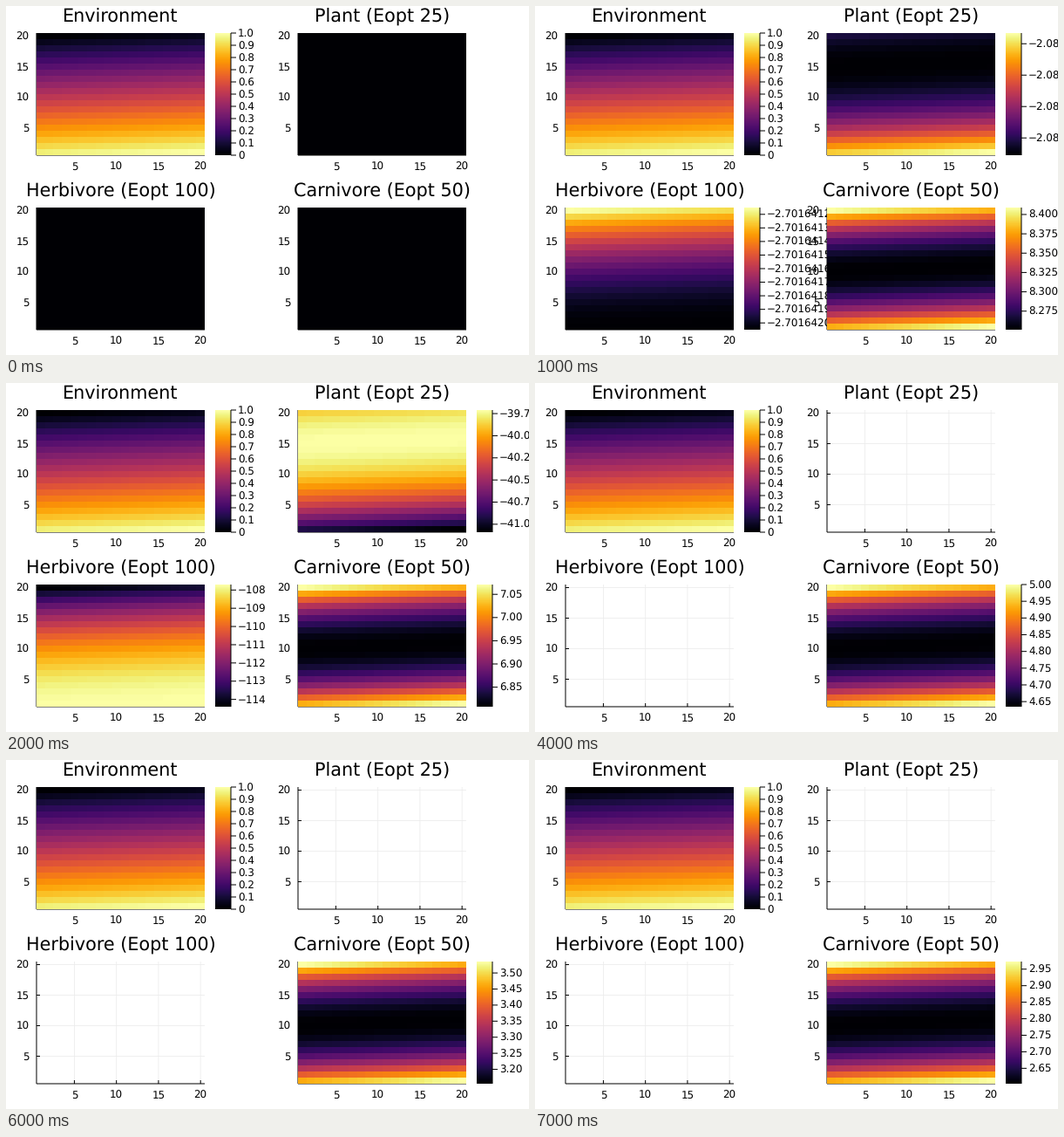
Animation, 600 px wide and 400 px high, one loop 8 s. Source, as a matplotlib script:

```python
import math

import matplotlib.pyplot as plt
import numpy as np
from matplotlib.animation import FuncAnimation

W, H = 600, 400
PX = 0.72                      # points per pixel at 100 dpi
TICK_SIZE, TITLE_SIZE = 11.9, 20.8
PANEL_W, PANEL_H = 193, 140
STEPS = 8

plt.rcParams["font.family"] = "DejaVu Sans"
plt.rcParams["text.hinting"] = "none"
fig = plt.figure(figsize=(W / 100, H / 100), dpi=100, facecolor="white")
ax = fig.add_axes([0, 0, 1, 1])

# Environment rises along each row and from the top row to the bottom one.
env = np.arange(400).reshape(20, 20) / 399
plant_dist = ((env - 0.25) / 0.75) ** 2
herb_dist = (1 - env) ** 2
carn_dist = ((env - 0.5) / 0.5) ** 2

# step: (low, high, tick spacing, label format, bend of the profile)
PLANT = {
    1: (-2.082355, -2.081966, 1e-4, ".4f", 0),
    2: (-41.09, -39.71, 0.25, ".2f", 0),
    3: (-3.02e26, -4.26e25, 5e25, ".2g", 1.96),
}
HERBIVORE = {
    1: (-2.70164205, -2.70164115, 1e-7, ".7f", 0),
    2: (-114.4, -107.7, 1, ".0f", 0),
    3: (-1.227e69, -1e66, 2.5e68, ".2g", 9),
}


def text(x, y, s, size=TICK_SIZE, ha="center", z=0):
    ax.text(x, y + 0.365 * size, s, fontsize=size * PX, ha=ha,
            va="baseline", color="black", zorder=z)


def line(xs, ys, z, color="black", width=1.0):
    ax.plot(xs, ys, color=color, lw=width * PX, zorder=z,
            solid_capstyle="butt", snap=False)


def cells(data, x, y, w, h, z):
    rows, cols = data.shape
    ax.pcolormesh(np.linspace(x, x + w, cols + 1),
                  np.linspace(y, y + h, rows + 1), data, cmap="inferno",
                  vmin=0, vmax=1, antialiased=False, zorder=z)


def label(value, fmt):
    if abs(value) < 1e-12:
        return "0"
    return format(value, fmt).upper().replace("E+", "E").replace("-", "\u2212")


def colorbar(x, y, lo, hi, step, fmt, z):
    cells(np.linspace(1, 0, PANEL_H)[:, None], x, y, 18, PANEL_H, z)
    line([x + 18] * 2, [y, y + PANEL_H], z + 1)
    first = math.ceil(lo / step - 1e-6)
    last = math.floor(hi / step + 1e-6)
    for k in range(first, last + 1):
        ty = y + PANEL_H * (hi - k * step) / (hi - lo)
        line([x + 18, x + 24], [ty, ty], z + 1)
        text(x + 26, ty, label(k * step, fmt), ha="left", z=z + 1)


def panel(x, y, title, data, bar, z):
    """Axes with a heatmap scaled to 0..1 and, if given, its colour bar."""
    bottom = y + PANEL_H
    text(x + PANEL_W / 2, y - 19.8, title, TITLE_SIZE, z=z)
    for v in (5, 10, 15, 20):
        tx = x + (v - 0.5) / 20 * PANEL_W
        ty = bottom - (v - 0.5) / 20 * PANEL_H
        line([tx, tx], [y, bottom], z, "#ececec", 0.8)
        line([x, x + PANEL_W], [ty, ty], z, "#ececec", 0.8)
        line([tx, tx], [bottom, bottom - 4], z + 1)
        line([x, x + 4], [ty, ty], z + 1)
        text(tx, bottom + 12.5, str(v), z=z + 1)
        text(x - 8.3, ty, str(v), ha="right", z=z + 1)
    line([x, x], [y, bottom], z + 1)
    line([x, x + PANEL_W], [bottom, bottom], z + 1)
    if data is not None:
        cells(data, x, y, PANEL_W, PANEL_H, z + 2)
    if bar:
        colorbar(x + 205, y, *bar, z + 3)


def diverging(step, dist, stages):
    """Flat at first, then running away until no finite value is left."""
    if step == 0:
        return np.zeros_like(dist), None
    if step not in stages:
        return None, None
    *bar, bend = stages[step]
    shape = np.expm1(bend * dist) / np.expm1(bend) if bend else dist
    return (shape if step == 1 else 1 - shape), bar


def decaying(step):
    if step == 0:
        return np.zeros_like(env), None
    low, high = 0.8251, 2 ** -0.25
    lo, hi = 10 * low ** step, 10 * high ** step
    value = 10 * (low + (high - low) * carn_dist) ** step
    bar = (lo, hi, 0.025, ".3f") if step == 1 else (lo, hi, 0.05, ".2f")
    return (value - lo) / (hi - lo), bar


def draw(step):
    ax.clear()
    ax.axis("off")
    panel(35, 31, "Environment", env, (0, 1, 0.1, ".1f"), 0)
    panel(335, 31, "Plant (Eopt 25)",
          *diverging(step, plant_dist, PLANT), 10)
    panel(35, 231, "Herbivore (Eopt 100)",
          *diverging(step, herb_dist, HERBIVORE), 20)
    panel(335, 231, "Carnivore (Eopt 50)", *decaying(step), 30)
    ax.set_xlim(0, W)
    ax.set_ylim(H, 0)
    return []


anim = FuncAnimation(fig, draw, frames=STEPS, interval=1000, repeat=True,
                     repeat_delay=0, blit=False)
plt.show()
```
